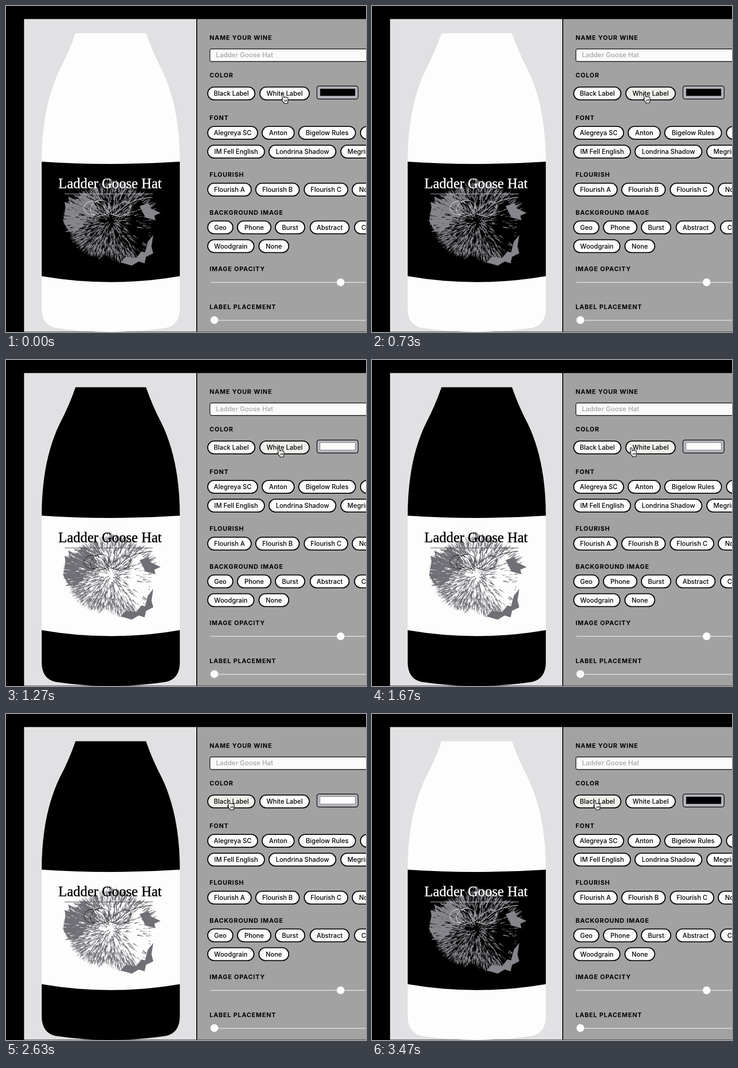
An HTML page for the animation above (3510 ms loop, 787 by 712 pixels).

```html
<!DOCTYPE html>
<html lang="en">
<head>
<meta charset="utf-8">
<title>Wine label designer</title>
<style>
  html, body { margin: 0; width: 100%; height: 100%; overflow: hidden; background: #000; }
  svg { display: block; font: 550 14px Inter, sans-serif; }
  svg.dark { --label: #000; --ink: #fdfdfd; --art: #85858b; --line: #cfc8d8; }
  svg.light { --label: #fdfdfd; --ink: #000; --art: #6f6f76; --line: #444; }
  .bottle { fill: var(--ink); }
  .label, .cuts, .swatch { fill: var(--label); }
  .art { fill: var(--art); }
  .line { fill: none; stroke: var(--line); }
  .flourish { fill: none; stroke: var(--ink); stroke-width: .9; }
  .title { font: 30.8px "Liberation Serif", serif; fill: var(--ink); stroke: var(--ink); stroke-width: .5; }
  .head { font-weight: 700; font-size: 13.5px; letter-spacing: 1.05px; }
  .pill rect { fill: #fdfdfd; stroke: #000; stroke-width: 2.2; }
  .pill text, .title { text-anchor: middle; }
</style>
</head>
<body>
<svg id="stage" class="dark" width="787" height="712" viewBox="0 0 787 712">
  <path fill="#e1e1e3" d="M39.5 28.5H416V712H39.5z"/>
  <path fill="#a2a2a3" d="M418 28.5H787V712H418z"/>
  <path fill="#444" d="M39 711H787v1H39z"/>
  <path class="bottle" d="M152 59.5H306Q320 100 340 138C368 195 380 265 380 340V660Q380 696 350 703Q290 712 229 712Q168 712 108 703Q78 696 78 660V340C78 265 90 195 118 138Q138 100 152 59.5z"/>
  <path class="label" d="M78 340Q229 350 380 340V590Q229 616 78 590z"/>
  <path class="art" d="M130 440L128 428 140 432 136 416 152 424 165 412 190 425 200 445 188 468 165 485 150 492 135 488 125 470zM292 437L312 430 316 442 338 452 324 458 327 468 305 462zM250 560L262 548 285 550 296 536 304 538 310 515 322 500 318 525 322 540 306 548 303 562 290 558 275 567z"/>
  <path class="cuts" id="cuts"/>
  <path class="art" id="spikes"/>
  <text class="title" x="227.5" y="398">Ladder Goose Hat</text>
  <path class="line" d="M128 410.5H321"/>
  <path class="flourish" d="M205 452C180 462 168 448 171 438C175 424 200 420 215 440C228 458 250 466 266 452C280 436 272 424 256 429C238 434 228 456 205 459C182 460 178 440 195 428C212 418 230 430 224 444M228 455C255 455 252 422 320 418"/>
  <rect x="445.7" y="93.7" width="400" height="27.6" rx="4" fill="#fafafa" stroke="#000" stroke-width="1.4"/>
  <text x="459" y="112" fill="#a6a6a1" style="font-size:14.5px">Ladder Goose Hat</text>
  <rect x="679.7" y="174.7" width="90" height="28.6" rx="5" fill="#b4b4bc" stroke="#000" stroke-width="1.4"/>
  <rect class="swatch" x="686.5" y="180.5" width="77" height="16" stroke="#888"/>
  <g id="controls"></g>
  <path stroke="#d9d8cf" stroke-width="2" d="M447 603.5H787M447 686.5H787"/>
  <g fill="#fdfdfd"><circle cx="731.5" cy="603.5" r="8.5"/><circle cx="455.5" cy="686" r="8.5"/></g>
  <g id="cursor"><path transform="rotate(-8)" fill="#fff" stroke="#000" stroke-width="1.2" stroke-linejoin="round" d="M-2 12V1.5a1.8 1.8 0 0 1 3.6 0V7a1.6 1.6 0 0 1 3 0a1.6 1.6 0 0 1 3 .8a1.5 1.5 0 0 1 2.6 1V13q0 3-1.8 5v2H.5V18L-4.5 11.5a1.6 1.6 0 0 1 2.5-1.8zM2.5 12v4M5 12v4M7.5 12v4"/></g>
</svg>
<script>
const $ = id => document.getElementById(id);
const LOOP = 3510;
const clamp = v => Math.max(0, Math.min(1, v));
const ease = v => { v = clamp(v); return v * v * (3 - 2 * v); };

// Headings and rows of pills: [text, left, width]
const headings = [["NAME YOUR WINE", 69], ["COLOR", 151], ["FONT", 244], ["FLOURISH", 368],
  ["BACKGROUND IMAGE", 451], ["IMAGE OPACITY", 574], ["LABEL PLACEMENT", 657]];
const rows = [
  [191, ["Black Label", 440, 105], ["White Label", 554, 110]],
  [277, ["Alegreya SC", 440, 111], ["Anton", 559, 72], ["Bigelow Rules", 639, 126], ["", 774, 90]],
  [318, ["IM Fell English", 440, 126], ["Londrina Shadow", 574, 148], ["Megrim", 731, 82]],
  [401, ["Flourish A", 440, 97], ["Flourish B", 545, 97], ["Flourish C", 651, 97], ["None", 756, 67]],
  [483.5, ["Geo", 440, 57], ["Phone", 505, 75], ["Burst", 588, 66], ["Abstract", 664, 87], ["Cards", 761, 71]],
  [524.5, ["Woodgrain", 440, 103], ["None", 552, 67]]
];
const pill = (y, [text, x, w]) => `<g class="pill"><rect x="${x + 1}" y="${y - 14}" width="${w - 2}" height="28" rx="14"/>
  <text x="${x + w / 2}" y="${y + 5}">${text}</text></g>`;
$("controls").innerHTML =
  headings.map(([text, y]) => `<text class="head" x="445" y="${y + 5}">${text}</text>`).join("") +
  rows.map(([y, ...pills]) => pills.map(p => pill(y, p)).join("")).join("");
const [blackPill, whitePill] = document.querySelectorAll(".pill rect");

// Burst artwork: seeded short spikes pointing away from one centre
let seed = 7;
const random = () => (seed = seed * 16807 % 2147483647) / 2147483647;
const CX = 230, CY = 470;
const rim = [92, 92, 104, 104, 84, 88, 95, 99, 107, 107, 94, 86, 98, 90, 97, 108]; // clockwise from the right
const rimAt = a => {
  const p = a / (2 * Math.PI) * rim.length, i = Math.floor(p) % rim.length;
  return rim[i] + (rim[(i + 1) % rim.length] - rim[i]) * (p % 1);
};
const spike = (a, from, to, w) => {
  const c = Math.cos(a), s = Math.sin(a), f = v => v.toFixed(1);
  const at = (r, o) => f(CX + r * c - o * s) + " " + f(CY + r * s + o * c);
  return `M${at(from, -w)}L${at(to, 0)} ${at(from, w)}z`;
};
// Dense on the left, open in the middle, almost empty on the right
const density = (x, y) => {
  if (((x - 288) / 24) ** 2 + ((y - 482) / 58) ** 2 < 1) return .1;
  return x < 200 ? .95 : .7;
};
let spikes = "", cuts = "";
for (let i = 0; i < 2000; i++) {
  const a = random() * 2 * Math.PI, max = rimAt(a) * (.9 + random() * .12);
  const r = max * Math.sqrt(random()) * .95, length = 5 + r * .1 + random() * 9;
  const keep = random() < density(CX + r * Math.cos(a), CY + r * Math.sin(a));
  if (keep && r > 5) spikes += spike(a, r, Math.min(r + length, max), .5 + random() * .7);
}
for (let i = 0; i < 110; i++) {
  const a = 2.7 + random() * 1.1, r = 25 + random() * 65;
  cuts += spike(a, r + 6 + random() * 12, r, .5 + random() * .8);
}
$("spikes").setAttribute("d", spikes);
$("cuts").setAttribute("d", cuts);

const shade = (rect, amount) => {
  rect.style.fill = `rgb(${253 - 13 * amount},${253 - 13 * amount},${253 - 18 * amount})`;
};
function draw(now) {
  const t = now % LOOP;
  const settle = ease(t / 500), travel = ease((t - 1500) / 500);
  $("cursor").setAttribute("transform", `translate(${605 - 9 * settle - 109 * travel} ${193.5 - settle - 2.5 * travel})`);
  shade(whitePill, clamp(t / 250) - clamp((t - 1710) / 250));
  shade(blackPill, clamp((t - 1745) / 250));
  $("stage").setAttribute("class", t >= 770 && t < 2670 ? "light" : "dark");
  requestAnimationFrame(draw);
}
draw(performance.now());
</script>
</body>
</html>
```
